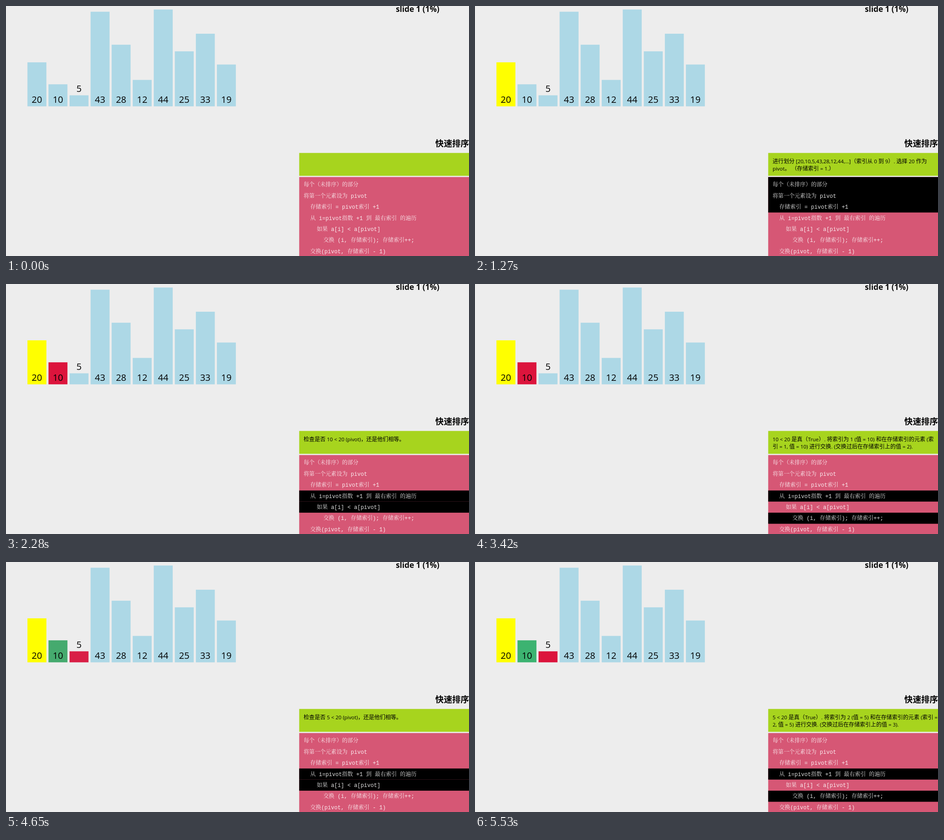
These frames come from a looping animation (1019x550 px, 8 s). An HTML page:

```html
<!DOCTYPE html>
<html lang="zh-CN">
<head>
<meta charset="utf-8">
<title>快速排序</title>
<style>
  html, body { margin: 0; width: 100%; height: 100%; overflow: hidden; background: #ededed; }
  svg { display: block; width: 1019px; height: 550px; }
  text { white-space: pre; text-spacing-trim: space-all; }

  .title { font: bold 17.2px "Open Sans", "Noto Sans", sans-serif; fill: #0a0a0a; }
  .heading { font: bold 18.6px "Noto Sans CJK SC", "Noto Sans CJK", sans-serif; }
  .label { font: 20px "Open Sans", "Noto Sans", sans-serif; text-anchor: middle; }
  .code text {
    font: 12.07px "Liberation Mono", "Noto Serif CJK SC", "Noto Sans CJK SC", "Noto Sans CJK", monospace;
    fill: #fff;
    fill-opacity: .88;
  }
  .status text { font: 12.07px "Noto Sans CJK SC", "Noto Sans CJK", sans-serif; }
  .status tspan { font: 11.4px "Open Sans", "Noto Sans", sans-serif; }

  .bar { fill: #add8e6; }
  .anim { animation: 8s step-end infinite; }
  .status g, .mark { opacity: 0; }

  #bar0 { animation-name: pivot; }
  #bar1 { animation-name: first; }
  #bar2 { animation-name: second; }
  #setup, #say0 { animation-name: choose; }
  #say1 { animation-name: check1; }
  #say2 { animation-name: swap1; }
  #say3 { animation-name: check2; }
  #say4 { animation-name: swap2; }
  #loop { animation-name: loop; }
  #test { animation-name: test; }
  #swap { animation-name: swap; }

  @keyframes pivot {
    0% { fill: #add8e6; }
    10.875%, 100% { fill: #ff0; }
  }
  @keyframes first {
    0% { fill: #add8e6; }
    26.75% { fill: #b3bfd0; }
    28.5% { fill: #dc143c; }
    56.75% { fill: #c82843; }
    58.125% { fill: #45aa6e; }
    59.75%, 100% { fill: #3cb371; }
  }
  @keyframes second {
    0% { fill: #add8e6; }
    56.75% { fill: #b3bfd0; }
    58.125% { fill: #d91f46; }
    59.75%, 100% { fill: #dc143c; }
  }
  @keyframes choose { 0%, 26.75%, 100% { opacity: 0; } 10.875% { opacity: 1; } }
  @keyframes check1 { 0%, 42.75%, 100% { opacity: 0; } 26.75% { opacity: 1; } }
  @keyframes swap1 { 0%, 56.75%, 100% { opacity: 0; } 42.75% { opacity: 1; } }
  @keyframes check2 { 0%, 69.125%, 100% { opacity: 0; } 56.75% { opacity: 1; } }
  @keyframes swap2 { 0% { opacity: 0; } 69.125%, 100% { opacity: 1; } }
  @keyframes loop { 0% { opacity: 0; } 26.75%, 100% { opacity: 1; } }
  @keyframes test {
    0%, 42.75%, 69.125%, 100% { opacity: 0; }
    26.75%, 56.75% { opacity: 1; }
  }
  @keyframes swap {
    0%, 56.75% { opacity: 0; }
    42.75%, 69.125%, 100% { opacity: 1; }
  }
</style>
</head>
<body>
<svg viewBox="0 0 1019 550">
  <text class="title" x="858" y="12.5">slide 1 (1%)</text>
  <g id="chart"></g>
  <text class="heading" x="944.8" y="309">快速排序</text>

  <rect x="645.3" y="323.3" width="380" height="50.3" fill="#a7d41e"/>
  <g class="status" id="status"></g>

  <rect x="645.3" y="376.3" width="380" height="180" fill="#d65775"/>
  <rect id="setup" class="mark anim" x="645.3" y="376.3" width="380" height="78"/>
  <rect id="loop" class="mark anim" x="645.3" y="454.3" width="380" height="24.4"/>
  <rect id="test" class="mark anim" x="645.3" y="478.7" width="380" height="24.4"/>
  <rect id="swap" class="mark anim" x="645.3" y="503.1" width="380" height="24.4"/>
  <g class="code" id="code"></g>
</svg>
<script>
  const values = [20, 10, 5, 43, 28, 12, 44, 25, 33, 19];

  const code = [
    [0, '每个（未排序）的部分'],
    [0, '将第一个元素设为 pivot'],
    [1, '存储索引 = pivot索引 +1'],
    [1, '从 i=pivot指数 +1 到 最右索引 的遍历'],
    [2, '如果 a[i] < a[pivot]'],
    [3, '交换 (i, 存储索引); 存储索引++;'],
    [1, '交换(pivot, 存储索引 - 1)']
  ];

  const messages = [
    ['进行划分 [20,10,5,43,28,12,44,...]（索引从 0 到 9）. 选择 20 作为',
     'pivot。 （存储索引 = 1.）'],
    ['检查是否 10 < 20 (pivot)，还是他们相等。'],
    ['10 < 20 是真（True）. 将索引为 1 (值 = 10) 和在存储索引的元素 (索',
     '引 = 1, 值 = 10) 进行交换. (交换过后在存储索引上的值 = 2).'],
    ['检查是否 5 < 20 (pivot)，还是他们相等。'],
    ['5 < 20 是真（True）. 将索引为 2 (值 = 5) 和在存储索引的元素 (索引 =',
     '2, 值 = 5) 进行交换. (交换过后在存储索引上的值 = 3).']
  ];

  const byId = id => document.getElementById(id);

  function add(parent, name, attrs, text = '') {
    const node = document.createElementNS('http://www.w3.org/2000/svg', name);
    for (const key in attrs) node.setAttribute(key, attrs[key]);
    node.textContent = text;
    return parent.appendChild(node);
  }

  // Latin runs get their own font, Chinese runs stay plain
  function addMixed(parent, x, y, line) {
    const text = add(parent, 'text', { x, y });
    for (const run of line.match(/[ -~]+|[^ -~]+/g)) {
      if (/[ -~]/.test(run)) add(text, 'tspan', {}, run);
      else text.append(run);
    }
  }

  const base = 220.7;
  values.forEach((value, i) => {
    const x = 47.2 + 46.33 * i;
    const height = value * 4.84;
    const y = base - height;
    add(byId('chart'), 'rect', { id: 'bar' + i, class: 'bar anim', x, y, width: 41.7, height });
    const labelY = height < 40 ? y - 7.2 : base - 7.4;
    add(byId('chart'), 'text', { class: 'label', x: x + 20.8, y: labelY }, value);
  });

  code.forEach(([indent, line], i) =>
    add(byId('code'), 'text', { x: 655 + 14.5 * indent, y: 397.4 + 24.4 * i }, line));

  messages.forEach((lines, i) => {
    const group = add(byId('status'), 'g', { id: 'say' + i, class: 'anim' });
    lines.forEach((line, row) => addMixed(group, 655, 345.6 + 16 * row, line));
  });
</script>
</body>
</html>
```
